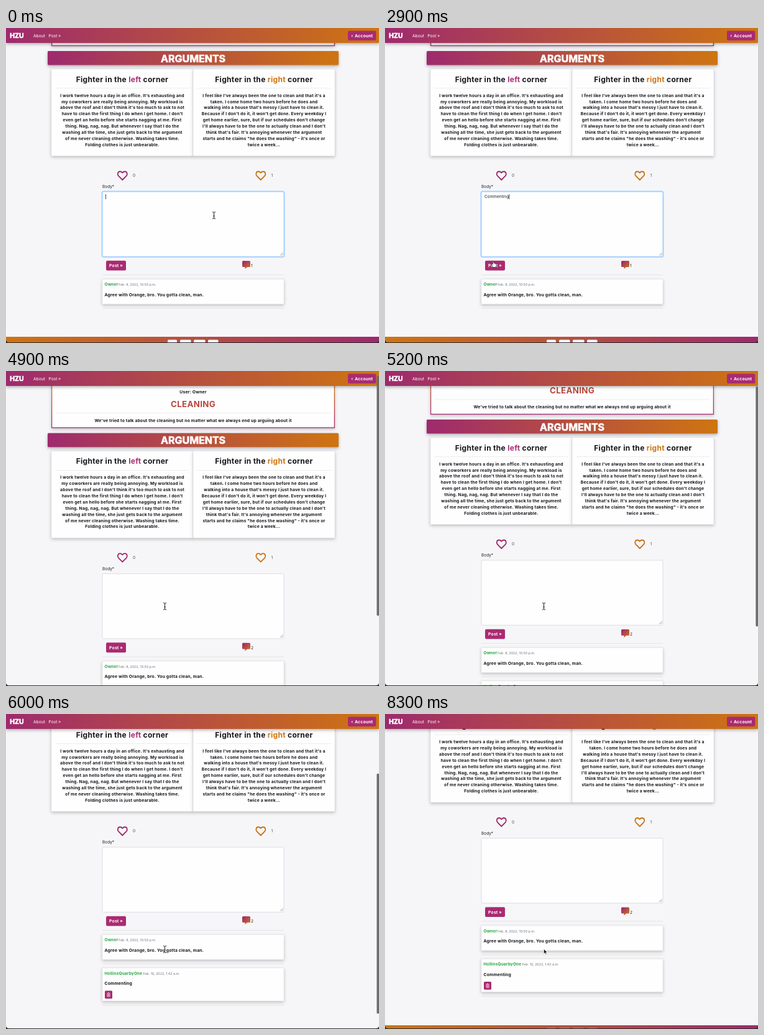
An HTML page that plays this animation: 600 by 506 pixels, repeating every 8400 ms.

```html
<!DOCTYPE html>
<html lang="en">
<head>
<meta charset="utf-8">
<title>Arguments</title>
<style>
  html, body { margin: 0; width: 100%; height: 100%; overflow: hidden; background: #f6f6f8; }
  svg { display: block; width: 600px; height: 506px; }
  text { font-family: Inter, "Open Sans", sans-serif; fill: #212529; }
  .b { font-weight: 700; letter-spacing: .025em; fill: #17181c; }
  .mid { text-anchor: middle; }
  .display { font-weight: 700; fill: #fff; stroke: #fff; stroke-width: .6; stroke-linejoin: round; }
  .white { fill: #fff; }
  .name { fill: #28a745; }
  .date { fill: #6c757d; }
  .card { fill: #fefefe; filter: drop-shadow(0 2px 2.5px rgba(0, 0, 0, .22)); }
  .bar { filter: drop-shadow(0 2px 2.5px rgba(0, 0, 0, .3)); }
  .hr { fill: #000; opacity: .09; }
  .btn { fill: #a92b71; }
</style>
</head>
<body>
<svg id="stage" viewBox="0 0 600 506">
  <defs>
    <linearGradient id="brand"><stop stop-color="#9e2a6e"/><stop offset="1" stop-color="#ce7511"/></linearGradient>
    <linearGradient id="back"><stop stop-color="#ce7511"/><stop offset="1" stop-color="#9e2a6e"/></linearGradient>
    <linearGradient id="down" x2="0" y2="1"><stop stop-color="#ce7511"/><stop offset="1" stop-color="#a92b71"/></linearGradient>
    <linearGradient id="diag" x2="1" y2="1"><stop offset=".1" stop-color="#9e2a6e"/><stop offset="1" stop-color="#d07a12"/></linearGradient>
    <path id="heart" d="M0 7L-6.3.7C-8.7-1.9-7.4-6.5-3.8-6.5C-2-6.5-.8-5.4 0-4.4C.8-5.4 2-6.5 3.8-6.5C7.4-6.5 8.7-1.9 6.3.7Z" fill="none" stroke-width="1.8" stroke-linejoin="round"/>
  </defs>
  <rect width="600" height="506" fill="#f6f6f8"/>
  <g id="page"></g>
  <g id="nav"></g>
  <rect id="thumb" x="596.4" width="3.6" height="386" rx="1.8" fill="#6b6b6e"/>
  <path d="M0 501Q.5 505 5 505H595Q599.500 505 600 501V506H0Z" fill="#2b2b30"/>
  <g id="mouse">
    <g id="ibeam" fill="none">
      <path d="M-2.500-5.500Q0-5.500 0-4V4Q0 5.500-2.500 5.500M2.500-5.500Q0-5.500 0-4M0 4Q0 5.500 2.500 5.500M-1.300 1H1.300" stroke="#fff" stroke-width="2" opacity=".7"/>
      <path d="M-2.500-5.500Q0-5.500 0-4V4Q0 5.500-2.500 5.500M2.500-5.500Q0-5.500 0-4M0 4Q0 5.500 2.500 5.500M-1.300 1H1.300" stroke="#111" stroke-width=".9"/>
    </g>
    <path id="arrow" d="M0-.5V7.200L1.800 5.600L3 8.300L4.300 7.700L3.100 5.100H5.400Z" fill="#111" stroke="#fff" stroke-width=".6"/>
    <path id="hand" d="M-2-4.500Q-1.200-5.500-.5-4.500L0-1.500L3-.6Q4.500 0 4.200 2L3.500 5.500H-1.500L-4-.2Q-3.800-1.400-2.600-.4L-1.500.8Z" fill="#fff" stroke="#222" stroke-width=".8" stroke-linejoin="round"/>
  </g>
</svg>
<script>
const $ = id => document.getElementById(id);
const LOOP = 8400, STEP = 100, RELOAD = 3400;
const TYPED = "Commenting", TYPE_START = 500, TYPE_END = 1900;

const text = (x, y, size, cls, str, extra = "") =>
  `<text x="${x}" y="${y}" font-size="${size}" class="${cls}" ${extra}>${str}</text>`;
const rect = (x, y, w, h, attrs) => `<rect x="${x}" y="${y}" width="${w}" height="${h}" ${attrs}/>`;
const rule = (x, y, w) => rect(x, y, w, .8, 'class="hr"');

const left = [
  "I work twelve hours a day in an office. It's exhausting and",
  "my coworkers are really being annoying. My workload is",
  "above the roof and I don't think it's too much to ask to not",
  "have to clean the first thing I do when I get home. I don't",
  "even get an hello before she starts nagging at me. First",
  "thing. Nag, nag, nag. But whenever I say that I do the",
  "washing all the time, she just gets back to the argument",
  "of me never cleaning otherwise. Washing takes time.",
  "Folding clothes is just unbearable."
];
const right = [
  "I feel like I've always been the one to clean and that it's a",
  "taken. I come home two hours before he does and",
  "walking into a house that's messy I just have to clean it.",
  "Because if I don't do it, it won't get done. Every weekday I",
  "get home earlier, sure, but if our schedules don't change",
  "I'll always have to be the one to actually clean and I don't",
  "think that's fair. It's annoying whenever the argument",
  "starts and he claims \"he does the washing\" - it's once or",
  "twice a week..."
];

function fighter(x, side, color, lines) {
  const cx = x + 114;
  return rect(x, 138, 228, 139.5, 'class="card" stroke="#dcdce0" stroke-width=".6"') +
    text(cx, 158.8, 12, "b mid", `Fighter in the <tspan fill="${color}">${side}</tspan> corner`) +
    rule(x + 6.5, 168.3, 215) +
    lines.map((s, i) => text(cx, (182.7 + i * 9.88).toFixed(2), 6.8, "b mid", s)).join("");
}

function likes(x, color, count) {
  return `<use href="#heart" x="${x}" y="309" stroke="${color}"/>` +
    text(x + 16.7, 311.4, 6.5, "", count, 'fill-opacity=".8"');
}

function comment(y, h, name, date, dateX, body) {
  return rect(155, y, 292, h, 'class="card" stroke="#dfdfe3" stroke-width=".5"') +
    text(158.5, y + 10.7, 6.5, "b name", name) +
    text(dateX, y + 10.7, 5.3, "date", date) +
    text(158.5, y + 27.2, 6.8, "b", body) +
    rule(155, y + h + 6.5, 292);
}

function trash(x, y) {
  return rect(x, y, 12, 12.8, 'rx="1.5" class="btn"') +
    `<path d="M${x + 3.5} ${y + 4.2}h5M${x + 5} ${y + 3.3}h2M${x + 4} ${y + 4.6}v4.800h4v-4.800M${x + 5.4} ${y + 5.5}v2.800M${x + 6.7} ${y + 5.5}v2.800" fill="none" stroke="#fff" stroke-width=".7"/>`;
}

$("page").innerHTML =
  rect(73.6, 31.1, 454.8, 69.3, 'class="card" style="stroke:url(#down);stroke-width:1.3"') +
  text(301, 45, 6.8, "b mid", "User: Owner") +
  text(301, 67, 13.3, "b mid", "CLEANING", 'style="fill:#b5473e"') +
  rule(80, 76.5, 442) +
  text(301, 91, 6.8, "b mid", "We've tried to talk about the cleaning but no matter what we always end up arguing about it") +
  rect(67, 109, 468, 22.5, 'rx="1.5" fill="url(#brand)" class="bar"') +
  text(301, 126.6, 16, "display mid", "ARGUMENTS") +
  fighter(73, "left", "#a92b71", left) +
  fighter(301, "right", "#ce7511", right) +
  likes(187.3, "#9e2a6a", 0) + likes(409.8, "#cb7214", 1) +
  text(155, 329.2, 6.5, "", "Body*") +
  rect(154.2, 334.2, 293.6, 105.8, 'id="glow" rx="3" fill="none" stroke="#bfdeff" stroke-width="2"') +
  rect(155, 335, 292, 104.3, 'id="field" rx="2" fill="#fefefe" stroke-width=".8"') +
  '<path d="M441 437.500L445.500 433M443.500 437.500L445.500 435.500" stroke="#777" stroke-width=".7"/>' +
  text(160, 345.3, 6.5, "", "", 'id="typed"') +
  rect(0, 339, .8, 8, 'id="caret" fill="#222"') +
  rect(161, 445.7, 32, 15.8, 'rx="2" class="btn"') +
  text(177, 456, 6.8, "b white mid", "Post »") +
  '<path d="M381.500 446H391.500Q393 446 393 447.500V454.500Q393 456 391.500 456H388L384.500 459V456H381.500Q380 456 380 454.500V447.500Q380 446 381.500 446Z" fill="url(#diag)"/>' +
  text(394, 456.4, 6.6, "", "1", 'id="count"') +
  rule(155, 468, 292) +
  comment(475.5, 40, "Owner", "Feb. 8, 2022, 10:50 p.m.", 181, "Agree with Orange, bro. You gotta clean, man.") +
  '<g id="reply">' +
  comment(529, 53, "HollinsQuarbyOne", "Feb. 10, 2022, 1:42 a.m.", 220.5, TYPED) +
  trash(159, 565.5) + "</g>" +
  '<g id="footer">' + rect(0, 0, 600, 60, 'fill="url(#back)"') +
  [[260, 15], [280, 17.5], [302, 18.5], [325, 16.5]]
    .map(([x, w]) => rect(x, 4.8, w, 16, 'rx="1.5" fill="#f7f3f5"')).join("") + "</g>";

$("nav").innerHTML =
  rect(0, 0, 600, 24, 'fill="url(#brand)" class="bar"') +
  text(6.3, 16, 10.4, "display", "HZU") +
  text(44, 14.6, 6.7, "white", "About") +
  text(68.5, 14.6, 6.7, "white", "Post »") +
  rect(550, 4.5, 45.3, 15.5, 'rx="2" class="btn"') +
  text(555.3, 14.5, 6.8, "b white", "‹") +
  text(561, 14.5, 6.8, "b white", "Account");

// Linear interpolation through [time, value...] keys
function track(keys, t) {
  if (t <= keys[0][0]) return keys[0].slice(1);
  for (let i = 1; i < keys.length; i++) {
    const a = keys[i - 1], b = keys[i];
    if (t < b[0]) {
      const k = (t - a[0]) / (b[0] - a[0]);
      return a.slice(1).map((v, j) => v + (b[j + 1] - v) * k);
    }
  }
  return keys[keys.length - 1].slice(1);
}

const scrollKeys = [[4700, 0], [5000, 14], [5200, 31], [5600, 69], [6000, 121], [6200, 133], [6300, 135.5]];
const mouseKeys = [
  [2000, 334.5, 301], [2200, 300, 315], [2500, 200, 368], [2700, 175, 379],
  [3400, 175, 379], [3600, 205, 381], [3900, 255.5, 378]
];

const show = (id, on) => $(id).setAttribute("visibility", on ? "visible" : "hidden");

function pointer(t, x, y, scroll) {
  if (t >= 3900) return t < 6300 ? "ibeam" : "arrow";
  const py = y + scroll;
  if (x > 155 && x < 447 && py > 335 && py < 439) return "ibeam";
  return x > 161 && x < 193 && py > 445 && py < 462 ? "hand" : "arrow";
}

function draw(t) {
  const posted = t >= RELOAD;
  const scroll = posted ? track(scrollKeys, t)[0] : 72;
  $("page").setAttribute("transform", `translate(0 ${-scroll})`);

  const progress = Math.max(0, Math.min(1, (t - TYPE_START) / (TYPE_END - TYPE_START)));
  $("typed").textContent = posted ? "" : TYPED.slice(0, Math.floor(progress * TYPED.length));
  $("caret").setAttribute("x", 160.2 + $("typed").getComputedTextLength());
  const typing = t >= TYPE_START && t < TYPE_END;
  const blink = t < TYPE_START || (t - TYPE_END) % 1000 < 500;
  show("caret", !posted && (typing || blink));
  show("glow", !posted);
  $("field").setAttribute("stroke", posted ? "#d3d7dc" : "#80bdff");

  $("count").textContent = posted ? 2 : 1;
  show("reply", posted);
  $("footer").setAttribute("transform", `translate(0 ${posted ? 635.5 : 568})`);

  $("thumb").setAttribute("y", scroll * .79);
  $("thumb").setAttribute("opacity", t < 4800 ? 0 : Math.max(0, Math.min(1, (7200 - t) / 300)));

  const [x, y] = track(mouseKeys, t);
  const kind = pointer(t, x, y, scroll);
  const hidden = t >= TYPE_START && t < 2000;
  $("mouse").setAttribute("transform", `translate(${x} ${y})`);
  for (const id of ["ibeam", "arrow", "hand"]) show(id, id === kind && !hidden);
}

const start = performance.now();
function frame() {
  const t = (performance.now() - start) % LOOP;
  draw(Math.floor(t / STEP) * STEP);
  requestAnimationFrame(frame);
}
frame();
</script>
</body>
</html>
```
